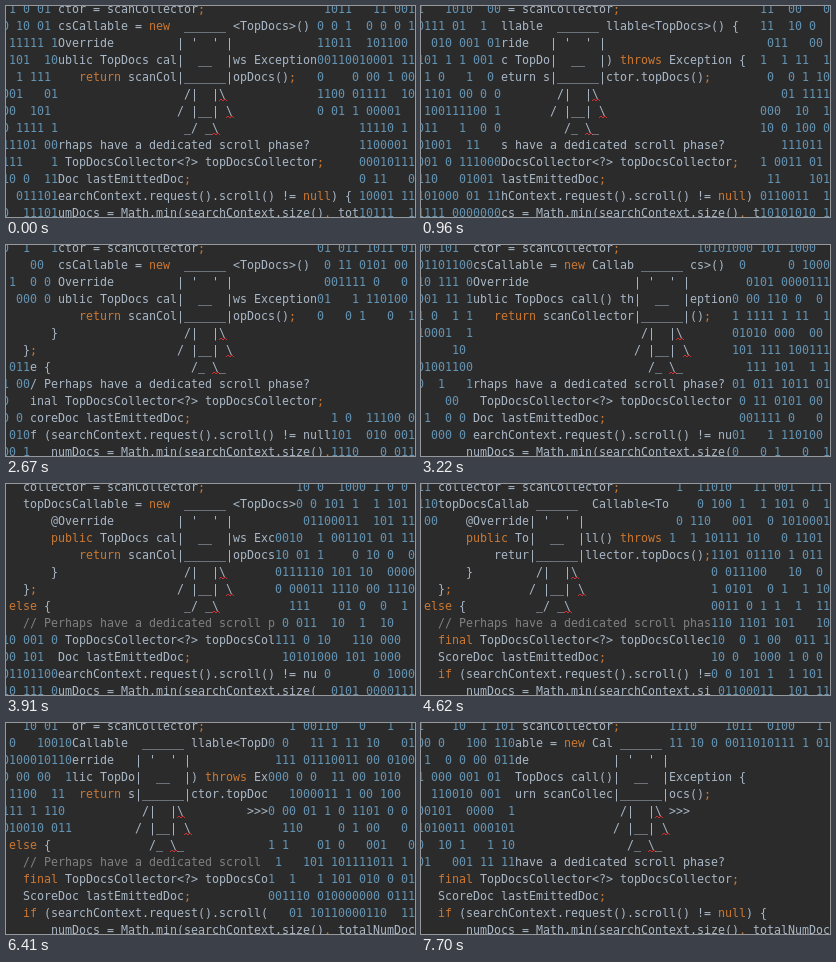
An HTML page with a canvas for the animation above (7850 ms loop, 409x211 px).

```html
<!DOCTYPE html>
<html lang="en">
<head>
<meta charset="utf-8">
<title>Robot in the editor</title>
<style>
  html, body { margin: 0; width: 100%; height: 100%; overflow: hidden; background: #2b2b2b; }
  canvas { display: block; }
</style>
</head>
<body>
<canvas id="stage" width="409" height="211"></canvas>
<script>
const ctx = document.getElementById('stage').getContext('2d');
const LOOP = 7850, TICK = LOOP / 56, LEAD = 39;
const COLS = 59, CELL = 7, LINE = 17;
const TEXT = '#a9b7c6', KEYWORD = '#cc7832', COMMENT = '#808080', DIGIT = '#6493b2', ERROR = '#d03030';

const code = [
  [3, 'collector = scanCollector;'],
  [3, 'topDocsCallable = new Callable<TopDocs>() {'],
  [7, '@Override'],
  [7, 'public TopDocs call() throws Exception {'],
  [11, 'return scanCollector.topDocs();'],
  [7, '}'],
  [3, '};'],
  [1, 'else {'],
  [3, '// Perhaps have a dedicated scroll phase?'],
  [3, 'final TopDocsCollector<?> topDocsCollector;'],
  [3, 'ScoreDoc lastEmittedDoc;'],
  [3, 'if (searchContext.request().scroll() != null) {'],
  [7, 'numDocs = Math.min(searchContext.size(), totalNumDocs);']
].map(([indent, line]) => (' '.repeat(indent) + line).padEnd(COLS));

// Showers of digits: starting tick and the column they reach.
// Each falls two rows per tick and stays SHOWER ticks on a row.
const SHOWER = 6;
const leftShowers = [[-6, 8], [1, 12], [9.5, 4], [17.5, 8], [32, 3], [42.8, 10], [51, 14]];
const rightShowers = [
  [-6, 51], [-3, 45], [1, 49], [8, 47], [17, 45],
  [23, 39], [27, 42], [31.5, 36], [40.5, 38], [54.5, 36]
];

// Turning points of the walk: tick, stride
const turns = [[0, 3], [6, 1], [9.5, 2], [13.5, 1], [23.5, 5], [37, -1.6], [56, 4]];

const body = [' ______ ', "| '  ' |", '|  __  |', '|______|', ' /|  |\\ ', '/ |__| \\'];
const feetLeft = ' _/ _\\  ', feetRight = '  /_ \\_ ';

function edge(showers, row, tick, dry) {
  const fallen = showers.filter(([start]) => start + row / 2 <= tick).pop();
  return fallen && tick - fallen[0] - row / 2 <= SHOWER ? fallen[1] : dry;
}

function robotAt(tick) {
  const i = turns.findIndex(([end]) => end > tick);
  const [t0, a] = turns[i - 1], [t1, b] = turns[i];
  const stride = Math.round(a + (b - a) * (tick - t0) / (t1 - t0));
  return { col: 16 + stride * 3, parts: [...body, b < a ? feetLeft : feetRight] };
}

function digit(line, col) {
  const s = Math.sin(line * 127.1 + col * 311.7) * 43758.5453;
  const v = s - Math.floor(s);
  return v < 0.37 ? ' ' : v < 0.68 ? '0' : '1';
}

function put(chars, col, str) {
  for (let i = 0; i < str.length; i++) chars[col + i] = str[i];
}

function colorize(line) {
  const colors = Array(COLS).fill(TEXT);
  const mark = (re, color) => {
    for (const m of line.matchAll(re)) colors.fill(color, m.index, m.index + m[0].length);
  };
  mark(/\b(new|null|public|return|throws|if|else|final)\b|[;,]/g, KEYWORD);
  mark(/\/\/.*/g, COMMENT);
  return colors;
}

function squiggle(x, y) {
  ctx.strokeStyle = ERROR;
  ctx.beginPath();
  for (let i = 0; i <= 4; i++) ctx.lineTo(x + i * 2, y + (i % 2 ? 0 : 2));
  ctx.stroke();
}

function drawRow(row, tick, robot) {
  const chars = [...code[row]];
  const left = edge(leftShowers, row, tick, 0);
  const right = edge(rightShowers, row, tick, COLS);
  const wet = c => c < left || c >= right;
  if (row === 5 && tick >= 40) put(chars, 35, '>>>>');
  for (let c = 0; c < COLS; c++) if (wet(c)) chars[c] = digit(tick * 2 - row, c);
  put(chars, robot.col, robot.parts[row - 1] || '');

  const colors = colorize(chars.join(''));
  const base = 7 + row * LINE;
  chars.forEach((ch, c) => {
    const x = c * CELL - 4;
    ctx.fillStyle = wet(c) ? DIGIT : colors[c];
    ctx.fillText(ch, x, base);
    if (ch === '\\') squiggle(x, base + 1);
  });
}

function draw(now) {
  const tick = Math.min(55, Math.floor((now % LOOP + LEAD) / TICK));
  const robot = robotAt(tick);
  ctx.fillStyle = '#2b2b2b';
  ctx.fillRect(0, 0, 409, 211);
  ctx.font = '11.63px "DejaVu Sans Mono", monospace';
  code.forEach((_, row) => drawRow(row, tick, robot));
}

const begin = performance.now();
function frame() {
  draw(performance.now() - begin);
  requestAnimationFrame(frame);
}
frame();
</script>
</body>
</html>
```
